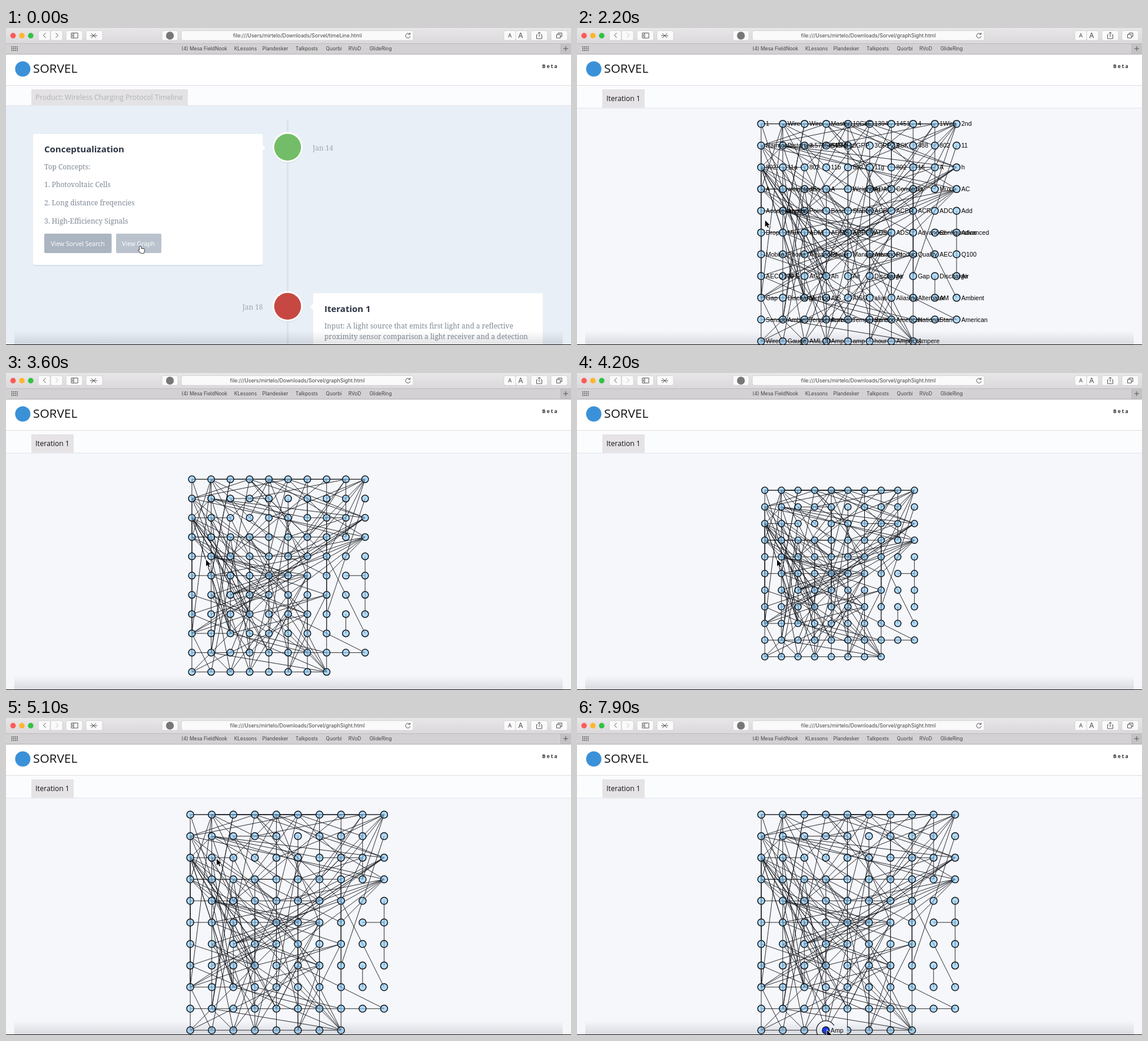
Write an HTML page with a canvas that moves like this. It is 960 px wide and 538 px high and loops after 8 s.

```html
<!DOCTYPE html>
<html lang="en">
<head>
<meta charset="utf-8">
<title>Timeline graph</title>
<style>
html, body { margin: 0; width: 960px; height: 538px; overflow: hidden; background: #f6f7fb; }
svg, canvas { position: absolute; left: 0; top: 0; }
.ui { font-family: Inter, Roboto, sans-serif; fill: #444; text-anchor: middle; }
.sans { font-family: "Open Sans", sans-serif; }
.serif { font: 11.9px "Noto Serif", serif; fill: #7f8a95; }
.title { font: bold 15px "Open Sans", sans-serif; fill: #2b3442; }
.icon { fill: none; stroke: #555; stroke-width: 1; }
.btn { font: 10.5px "Open Sans", sans-serif; fill: #fff; text-anchor: middle; }
</style>
</head>
<body>
<svg width="960" height="538">
  <defs>
    <linearGradient id="bar" x2="0" y2="1">
      <stop stop-color="#e8e6e8"/><stop offset="1" stop-color="#d2d0d2"/>
    </linearGradient>
  </defs>
  <rect width="960" height="44" fill="url(#bar)"/>
  <rect y="26" width="960" height="18" fill="#d3d1d3"/>
  <path d="M0 26.5H960M942.5 27V44" stroke="#bdbbbd"/>
  <rect x="943" y="27" width="17" height="17" fill="#c4c2c4"/>
  <circle cx="12" cy="13" r="4.7" fill="#fc5b57"/>
  <circle cx="27" cy="13" r="4.7" fill="#fdb62f"/>
  <circle cx="42" cy="13" r="4.7" fill="#2fc343"/>
  <g id="buttons"></g>
  <path class="icon" d="M67.500 8.500L63.500 12.500L67.500 16.500M111 8.500H122V17H111ZM115 8.500V17M113 10.500V15M145 9L153 17M145 17L153 9M143 13H155M903 11.500H901.500V18H910.500V11.500H909M906 15V7M903.500 9.500L906 7L908.500 9.500M935.500 11H942V17H935.500ZM938 11V8.500H944.500V14.500H942M951 31V39M947 35H955"/>
  <path id="forward" class="icon" d="M84.500 8.500L88.500 12.500L84.500 16.500"/>
  <circle cx="278.500" cy="13" r="6.700" fill="#777"/>
  <path id="reload" class="icon" d="M686 10.500A4 4 0 1 0 686.800 14M686.500 8V11H683.500"/>
  <path id="stop" class="icon" d="M679 9L687 17M687 9L679 17"/>
  <rect id="progress" x="299" y="19" height="1.800" fill="#2673e8"/>
  <g class="ui">
    <text id="url" x="495" y="16.300" font-size="8.800"></text>
    <text x="856" y="16" font-size="9">A</text>
    <text x="874.500" y="17" font-size="12">A</text>
  </g>
  <g id="marks" class="ui" font-size="8.400"></g>
  <path d="M9 32H20M9 35H20M9 38H20" stroke="#555" stroke-width="1.700" stroke-dasharray="1.900 1.200"/>

  <rect y="44" width="960" height="54" fill="#fff"/>
  <circle cx="28.500" cy="69.500" r="13" fill="#3b91d8"/>
  <text class="sans" x="46" y="76" font-size="20.800" fill="#111">SORVEL</text>
  <text class="sans" x="911" y="68" font-size="8.500" font-weight="bold" letter-spacing="2" fill="#333">Beta</text>

  <g id="timeline">
    <rect y="98" width="960" height="33" fill="#fbfcfe"/>
    <rect y="131" width="960" height="407" fill="#e9eff6"/>
    <path d="M0 131.500H960" stroke="#e0e6ee"/>
    <rect x="43" y="104" width="266" height="27" fill="#e4e2e4"/>
    <text class="sans" x="50" y="122" font-size="12" fill="#aeb3ba">Product: Wireless Charging Protocol Timeline</text>
    <rect x="477" y="155" width="3.200" height="383" fill="#d7e4ee"/>
    <g fill="#d5e1ea">
      <rect x="46" y="182" width="390" height="222" rx="3"/>
      <circle cx="478.500" cy="204" r="25.500"/><circle cx="478.500" cy="474" r="25.500"/>
    </g>
    <g fill="#fff">
      <rect x="46" y="180" width="390" height="222" rx="3"/>
      <rect x="522" y="450" width="390" height="100" rx="3"/>
      <path d="M435 197L440.500 203L435 209ZM522.500 467L517 473L522.500 479Z"/>
      <circle cx="478.500" cy="202.300" r="25.700"/><circle cx="478.500" cy="472.300" r="25.700"/>
    </g>
    <circle cx="478.500" cy="202.300" r="22.800" fill="#73bd69"/>
    <circle cx="478.500" cy="472.300" r="22.800" fill="#c74843"/>
    <text class="title" x="65" y="211">Conceptualization</text>
    <text class="title" x="541" y="482">Iteration 1</text>
    <g class="serif">
      <text x="65" y="239.500">Top Concepts:</text>
      <text x="65" y="270">1. Photovoltaic Cells</text>
      <text x="65" y="301">2. Long distance freqencies</text>
      <text x="65" y="332">3. High-Efficiency Signals</text>
      <text x="541" y="509.500">Input: A light source that emits first light and a reflective</text>
      <text x="541" y="528">proximity sensor comparison a light receiver and a detection</text>
      <g fill="#a0a9b3">
        <text x="521" y="207.500">Jan 14</text>
        <text x="436.500" y="477.500" text-anchor="end">Jan 18</text>
      </g>
    </g>
    <rect x="65" y="349" width="114.500" height="33" rx="2" fill="#abb5c1"/>
    <rect x="187" y="349" width="77" height="33" rx="2" fill="#bac3cd"/>
    <text class="btn" x="122" y="369.500">View Sorvel Search</text>
    <text class="btn" x="225" y="369.500">View Graph</text>
  </g>

  <g id="graph">
    <rect y="98" width="960" height="38" fill="#fbfcfe"/>
    <rect y="136" width="960" height="402" fill="#f6f7fb"/>
    <path d="M0 136H960" stroke="#dfe2e8"/>
    <rect x="43" y="104" width="72" height="31.500" fill="#e5e3e5"/>
    <text class="sans" x="50" y="124" font-size="12" fill="#111">Iteration 1</text>
  </g>
  <path d="M0 44.500H960" stroke="#b4b2b4"/>
  <path d="M0 97.500H960" stroke="#dcdfe4"/>
</svg>
<canvas id="view" width="960" height="538"></canvas>
<script>
const $ = id => document.getElementById(id);
const ctx = $('view').getContext('2d');
const LOOP = 8000, OPENED = 1000, LOADED = 1400, LABELS_OFF = 3000;

const boxes = [[55, 20], [76, 20], [102, 28], [136, 28], [265, 27], [298, 394], [846, 20], [866, 20], [892, 28], [926, 28]];
$('buttons').innerHTML = boxes.map(([x, w]) =>
  `<rect x="${x}" y="4.500" width="${w}" height="16.500" rx="3" fill="#fbfafb" stroke="#c6c4c6" stroke-width=".6"/>`).join('');
const marks = [['(4) Mesa FieldNook', 337], ['KLessons', 407], ['Plandesker', 457.500], ['Talkposts', 511],
  ['Quorbi', 557], ['RVoD', 592.500], ['GlideRing', 636.500]];
$('marks').innerHTML = marks.map(([name, x]) => `<text x="${x}" y="38">${name}</text>`).join('');

const labels = `1 Wire Wire Master 10GbE 1394 1451 4 1Wire 2nd
Harmonic Distortion 3.579545MHz 545MHz 3GPP 3GPP2,4 PSK 488 802 11
802 11a 802 11b 802 11g 802 16 A h
A weighted dBs A Weighting ADAC Converter D Mux AC
Accelerometer Access Point Base Station ACP ACPR ACR ADC Add
Drop Mux ADM ADMS ADPCM ADS ADSL Advanced Configuration Advanced
Mobile Phone Advanced Power Management Advanced Product Quality AEC Q100
AECQ100 AFE AGC Ah Air Discharge Air Gap Discharge Air
Gap Discharge Method AIS AISG alias Aliasing Alternator AM Ambient
Sensor Ambient Temperature Ambient Temperature Sensor American National Stan American
Wire Gauge AMLCD Amp amp hour Ampacity Ampere`.split(/\s+/);

// Main links by node index (ten nodes per row); the rest are seeded
const fans = {
  0: [100, 31], 1: [9, 25, 34, 43, 80], 2: [51], 3: [14, 47, 46, 36, 29], 4: [74, 22, 56, 29],
  5: [18, 44, 27], 7: [107, 42], 8: [13, 38], 9: [17, 36, 55, 24], 10: [64, 83, 39],
  11: [46, 38, 29, 73], 12: [14], 20: [73, 65, 107, 63, 94, 82], 29: [54, 63, 72, 45, 80],
  39: [44, 62, 80, 46, 57], 30: [37], 40: [44], 49: [79], 50: [53], 58: [59],
  78: [88], 89: [47], 99: [75], 90: [99], 103: [107], 107: [74, 75, 91, 70, 65], 102: [51, 73],
  73: [43, 31], 85: [55]
};
const links = Object.entries(fans).flatMap(([a, list]) => list.map(b => [+a, b]));
let seed = 29;
const rand = n => {
  seed = (seed * 1664525 + 1013904223) % 4294967296;
  return Math.floor(seed / 4294967296 * n);
};
const col = n => n % 10, row = n => Math.floor(n / 10);
const sparse = n => col(n) > 7 && row(n) > 3;
while (links.length < 185) {
  const a = rand(108), b = rand(108);
  const far = Math.abs(col(a) - col(b)) + Math.abs(row(a) - row(b));
  if (far > 1 && far < 9 && !sparse(a) && !sparse(b)) links.push([a, b]);
}

// Keys are [time, value, ...]
function track(keys, t) {
  const i = keys.findIndex(k => k[0] > t);
  if (i < 0) return keys[keys.length - 1].slice(1);
  const a = keys[Math.max(i - 1, 0)], b = keys[i];
  const u = Math.max(0, (t - a[0]) / (b[0] - a[0])), e = u * u * (3 - 2 * u);
  return a.slice(1).map((v, k) => v + (b[k + 1] - v) * e);
}
const zoomKeys = [[0, 36.9], [3000, 36.9], [3200, 35.9], [4100, 28.25], [4200, 28.25], [4500, 36.6]];
const mouseKeys = [[0, 228, 369], [1400, 228, 369], [2500, 340, 317], [4500, 340, 317], [5100, 358, 239],
  [6400, 351, 177], [7800, 425, 530]];

function disc(x, y, r, fill, width) {
  ctx.beginPath();
  ctx.arc(x, y, r, 0, 7);
  ctx.fillStyle = fill;
  ctx.fill();
  ctx.lineWidth = width;
  ctx.strokeStyle = '#10161c';
  ctx.stroke();
}

function label(n, x, y) {
  ctx.fillStyle = '#000';
  ctx.fillText(labels[n], x + 8, y + 3.8);
}

function drawGraph(t, mx, my) {
  const [step] = track(zoomKeys, t);
  const r = 6 + (step - 36.6) * .06;
  const place = n => [339.4 + (col(n) - .72) * step, 318 + (row(n) - 4.21) * step];
  ctx.font = '10.6px "Liberation Sans", Arial, sans-serif';
  ctx.beginPath();
  for (const [a, b] of links) {
    ctx.moveTo(...place(a));
    ctx.lineTo(...place(b));
  }
  ctx.lineWidth = .9;
  ctx.strokeStyle = '#15181c';
  ctx.stroke();
  labels.forEach((_, n) => disc(...place(n), r, 'rgba(134,200,249,.62)', 1.5));
  if (t < LABELS_OFF) labels.forEach((_, n) => label(n, ...place(n)));
  const over = labels.findIndex((_, n) => {
    const [x, y] = place(n);
    return Math.hypot(x - mx, y - my) < r;
  });
  if (over < 0) return;
  const [x, y] = place(over);
  disc(x, y, 16, '#f8f9fc', 1.3);
  ctx.fillStyle = '#f8f9fc';
  ctx.fillRect(x, y - 8, ctx.measureText(labels[over]).width + 14, 16);
  disc(x, y, r, '#1238f5', 1.5);
  label(over, x, y);
}

const arrow = new Path2D('M0 0V11L2.600 8.600L4.400 12.600L6.200 11.800L4.500 8H8Z');
const hand = new Path2D('M0 2Q1 .500 2 2L3 6L4.500 5.300L6 6L7.500 6Q8.500 7 8 9L7 13H2.500L-2 8.500Q-1.500 7 0 8Z');
function drawMouse(x, y, shape, fill, line) {
  ctx.save();
  ctx.translate(x, y);
  ctx.lineWidth = 1.4;
  ctx.strokeStyle = line;
  ctx.stroke(shape);
  ctx.fillStyle = fill;
  ctx.fill(shape);
  ctx.restore();
}

function show(id, on) { $(id).style.display = on ? '' : 'none'; }

function draw(t) {
  const opened = t >= OPENED, loading = t >= 600 && t < LOADED;
  show('timeline', !opened);
  show('graph', opened);
  show('reload', !loading);
  show('stop', loading);
  show('progress', loading);
  $('progress').setAttribute('width', Math.min(392, 60 + Math.max(0, t - 600) * .573));
  $('forward').style.stroke = opened ? '#bbb' : '#555';
  $('url').textContent = `file:///Users/mirtelo/Downloads/Sorvel/${t < 600 ? 'timeLine' : 'graphSight'}.html`;

  ctx.clearRect(0, 0, 960, 538);
  const [mx, my] = track(mouseKeys, t);
  if (opened) drawGraph(t, mx, my);
  const shade = ctx.createLinearGradient(0, 514, 0, 537);
  shade.addColorStop(0, 'rgba(80,85,95,0)');
  shade.addColorStop(1, 'rgba(80,85,95,.17)');
  ctx.fillStyle = shade;
  ctx.fillRect(14, 514, 932, 23);
  ctx.fillStyle = '#16181b';
  ctx.fillRect(0, 537, 960, 1);
  if (opened) drawMouse(mx, my, arrow, '#000', '#fff');
  else drawMouse(mx - 1, my, hand, '#fff', '#111');
}

const start = performance.now();
function tick() {
  draw((performance.now() - start) % LOOP);
  requestAnimationFrame(tick);
}
tick();
</script>
</body>
</html>
```
